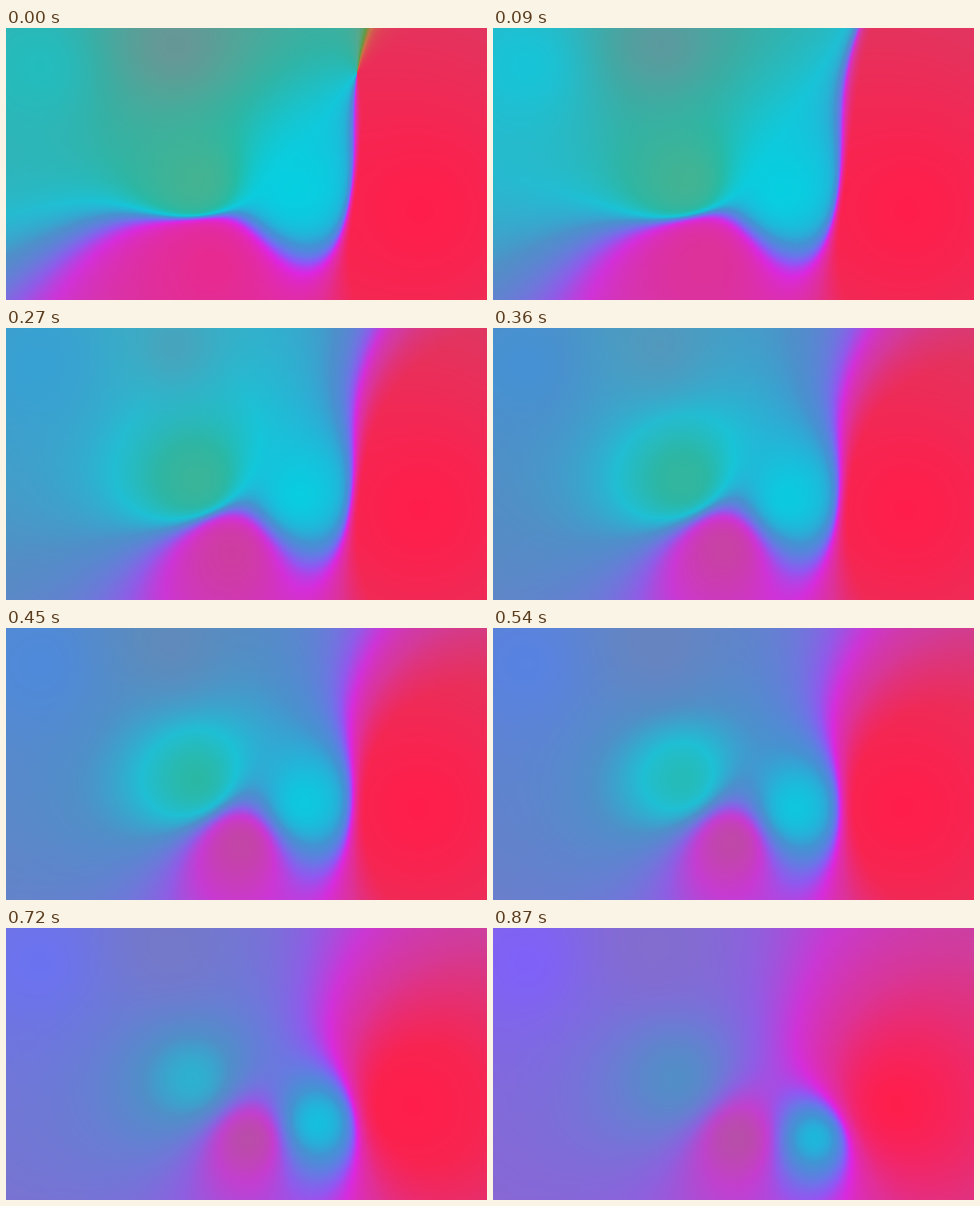
An HTML page with a canvas for the animation above (900 ms loop, 570 by 322 pixels).

```html
<!DOCTYPE html>
<html lang="en">
<head>
<meta charset="utf-8">
<title>Drifting gradient</title>
<style>
html, body { margin: 0; width: 100%; height: 100%; overflow: hidden; background: #5b8fd0; }
canvas { display: block; width: 570px; height: 322px; }
</style>
</head>
<body>
<canvas id="stage" width="570" height="322"></canvas>
<script>
const W = 570, H = 322, LOOP = 900, STEP = 30;
const GREY = [130, 125, 160], HAZE = 2e-5, CORE = 200;

const linear = t => t;
const easeIn = t => t * t;
const easeOut = t => t * (2 - t);

// Each source drifts between two states: x, y, hue, pull, dullness
const SOURCES = [
  { ease: linear, from: [40, 45, 176, .7, .15], to: [40, 40, 252, .8, 0] },
  { ease: linear, from: [200, 20, 150, .6, .55], to: [190, 20, 255, .8, .5] },
  { ease: easeIn, from: [230, 180, 153, .8, .05], to: [217, 178, 205, .8, .3] },
  { ease: easeIn, from: [342, 192, 184, 1.4, 0], to: [380, 248, 190, .7, 0] },
  { ease: easeOut, from: [245, 280, 330, 1.6, .05], to: [290, 248, 320, .6, .5] },
  { ease: easeIn, from: [490, 215, 360, 2.2, 0], to: [477, 208, 346, 2.4, 0] }
];

// Colours around the hue circle: degrees, then red, green, blue
const STOPS = [
  [0, 255, 30, 75], [40, 220, 110, 50], [100, 90, 160, 40],
  [150, 72, 180, 140], [168, 30, 192, 165], [184, 5, 208, 225],
  [205, 60, 150, 215], [238, 105, 115, 242], [265, 148, 80, 255],
  [298, 228, 30, 230], [328, 235, 38, 150], [346, 255, 30, 75], [360, 255, 30, 75]
];
const mix = (a, b, f) => a + (b - a) * f;

function wheel(h) {
  const i = STOPS.findIndex(s => s[0] >= h) || 1;
  const a = STOPS[i - 1], b = STOPS[i], f = (h - a[0]) / (b[0] - a[0]);
  return [1, 2, 3].map(k => mix(a[k], b[k], f));
}
const FINE = 4;
const HUES = Array.from({ length: 360 * FINE + 1 }, (_, i) => wheel(i / FINE));

function pose(t) {
  return SOURCES.map(({ ease, from, to }) => {
    const [x, y, hue, pull, dull] = from.map((v, i) => mix(v, to[i], ease(t)));
    const a = hue * Math.PI / 180;
    return { x, y, pull, dull, cos: Math.cos(a), sin: Math.sin(a) };
  });
}

// Inverse-square blend of the hues as directions, with a faint grey haze
function paint(t) {
  const img = new ImageData(W, H), px = img.data, sources = pose(t);
  let o = 0;
  for (let y = 0; y < H; y++) {
    for (let x = 0; x < W; x++) {
      let c = 0, s = 0, sum = HAZE, grey = HAZE;
      for (const p of sources) {
        const dx = x - p.x, dy = y - p.y;
        const w = p.pull / (dx * dx + dy * dy + CORE);
        c += w * p.cos;
        s += w * p.sin;
        sum += w;
        grey += w * p.dull;
      }
      const hue = (Math.atan2(s, c) * 180 / Math.PI + 360) % 360;
      const rgb = HUES[Math.round(hue * FINE)], dull = grey / sum;
      for (let k = 0; k < 3; k++) px[o++] = mix(rgb[k], GREY[k], dull);
      px[o++] = 255;
    }
  }
  return img;
}

const ctx = document.getElementById('stage').getContext('2d');
const cache = [];
let shown = -1;

function draw() {
  const n = Math.floor(performance.now() % LOOP / STEP);
  if (n !== shown) {
    cache[n] = cache[n] || paint(n * STEP / (LOOP - STEP));
    ctx.putImageData(cache[n], 0, 0);
    shown = n;
  }
  requestAnimationFrame(draw);
}
draw();
</script>
</body>
</html>
```
